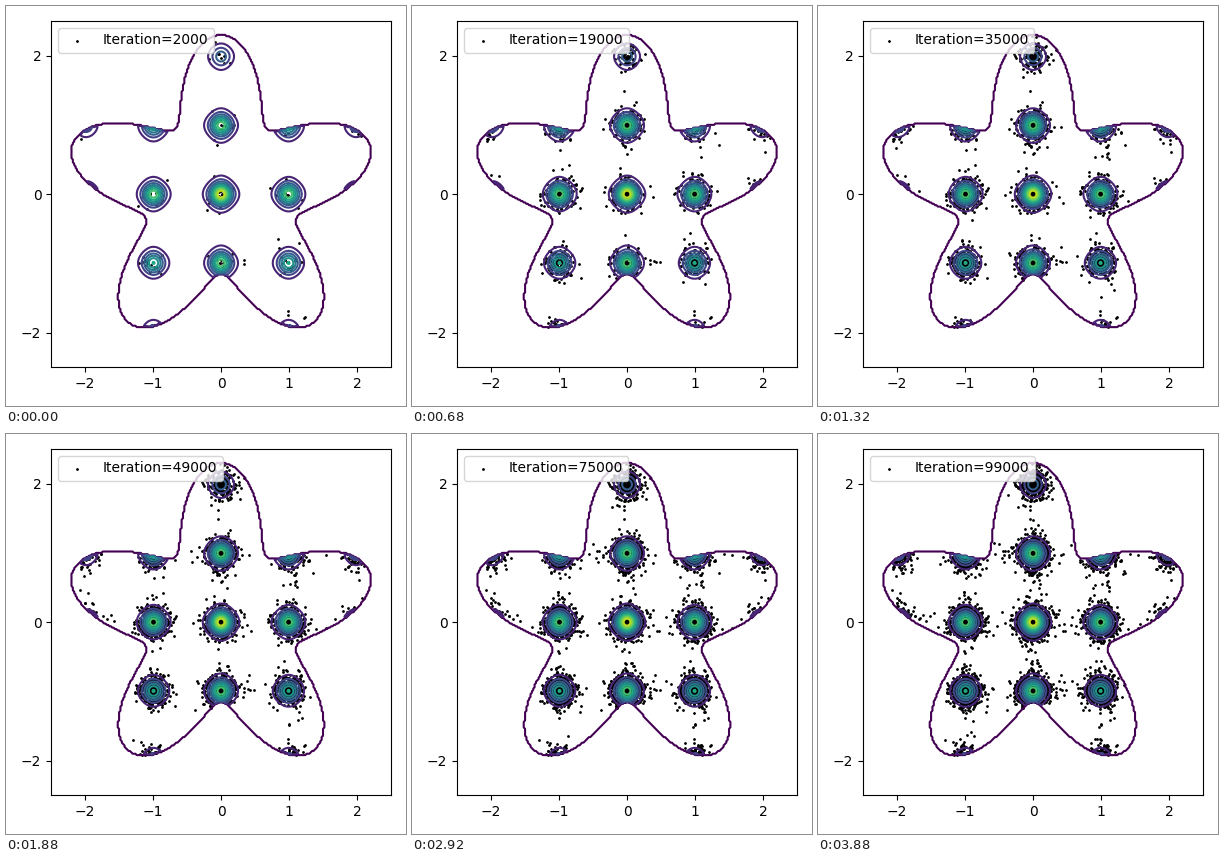
Recreate the animation shown at these times as a matplotlib script. Size 400 by 400 pixels, loop 3.92 s.

```python
import numpy as np
import matplotlib.pyplot as plt
from matplotlib.animation import FuncAnimation

FRAMES, INTERVAL = 98, 40
PER_FRAME = 90
TEMPERATURE = 4
RIPPLE = 8.2
SHARPNESS = 1.35


def density(x, y):
    """Boltzmann weight of a Rastrigin-type energy, cut to a five-armed star."""
    waves = 2 - np.cos(2 * np.pi * x) - np.cos(2 * np.pi * y)
    energy = x**2 + y**2 + RIPPLE * waves
    radius = 1.72 + 0.57 * np.sin(5 * np.arctan2(y, x))
    return np.exp(-energy / TEMPERATURE) * (np.hypot(x, y) < radius)


def sample(rng, count):
    """Rejection sampling, a little tighter around the peaks than the contours."""
    xy = rng.uniform(-2.4, 2.4, (count * 120, 2))
    accepted = rng.random(len(xy)) < density(*xy.T) ** SHARPNESS
    return xy[accepted][:count]


points = sample(np.random.default_rng(12), PER_FRAME * (FRAMES + 1))

fig, ax = plt.subplots(figsize=(4, 4), dpi=100)
axis = np.linspace(-2.5, 2.5, 251)
X, Y = np.meshgrid(axis, axis)
ax.contour(X, Y, density(X, Y), levels=np.linspace(0, 1, 11), cmap="viridis")
dots = ax.scatter([], [], s=1, c="k", label="Iteration=2000")
label = ax.legend(loc="upper left").get_texts()[0]
ax.set(xlim=(-2.5, 2.5), ylim=(-2.5, 2.5), xticks=range(-2, 3), yticks=(-2, 0, 2))
fig.tight_layout()


def update(i):
    dots.set_offsets(points[:PER_FRAME * (i + 2)])
    label.set_text(f"Iteration={2000 + 1000 * i}")
    return dots, label


anim = FuncAnimation(fig, update, frames=FRAMES, interval=INTERVAL,
                     init_func=lambda: update(0), repeat=True, repeat_delay=0)
plt.show()
```
